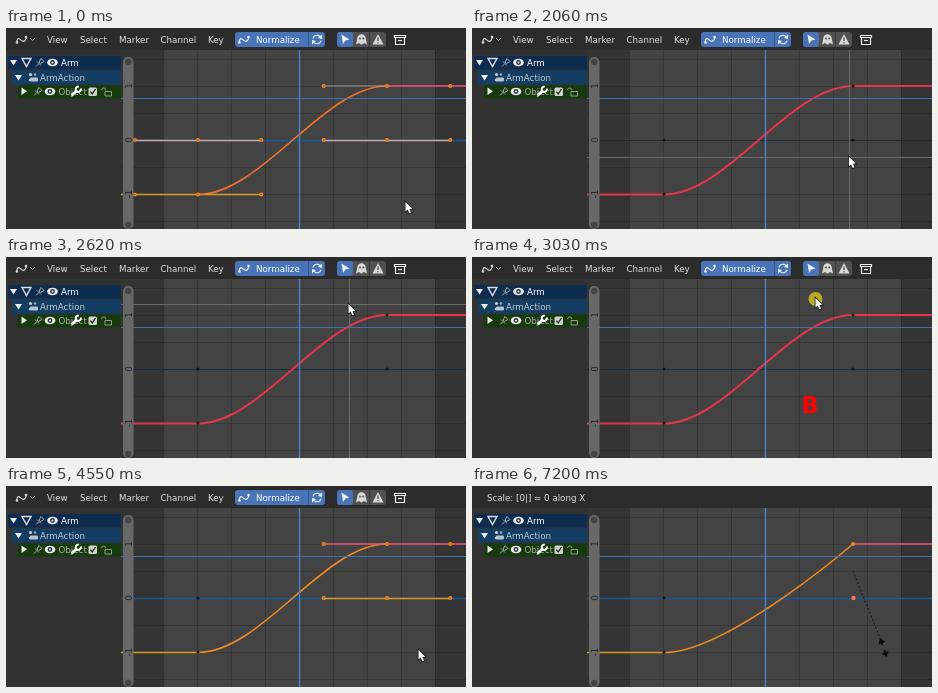
These frames come from a looping animation (460 px wide and 201 px high, 8000 ms). An HTML page with a canvas:

```html
<!DOCTYPE html>
<html lang="en">
<head>
<meta charset="utf-8">
<title>Graph editor: box select and scale</title>
<style>
html, body { margin: 0; width: 100%; height: 100%; overflow: hidden; background: #303030; }
canvas { display: block; width: 460px; height: 201px; }
</style>
</head>
<body>
<canvas id="stage"></canvas>
<script>
const W = 460, H = 201, LOOP = 8000;
const canvas = document.getElementById('stage');
const dpr = window.devicePixelRatio || 1;
canvas.width = W * dpr;
canvas.height = H * dpr;
const c = canvas.getContext('2d');

const UI = '8.7px "DejaVu Sans", sans-serif';
const KEY = 'bold 22.5px "DejaVu Sans", sans-serif';
const ORANGE = '#f08a22', RED = '#e5354d', PINK = '#f0567a', BLUE = '#17589c', YELLOW = '#d99a1e';
const TOP = 58, MID = 112, LOW = 166, KEY_A = 192, KEY_B = 381, HANDLE = 63.3;

// Pointer path: time, x, y
const PATH = [
  [0, 399.5, 174], [1930, 399.5, 174], [2060, 377, 129], [2300, 358, 83], [2620, 342.5, 47],
  [2770, 343.5, 41], [3210, 343.5, 41], [3440, 368, 80], [3660, 396.5, 122],
  [3840, 406, 147], [4100, 406, 147], [4400, 412.5, 164], [LOOP, 412.5, 164]
];

function pointer(t) {
  let i = 1;
  while (t > PATH[i][0]) i++;
  const [t0, x0, y0] = PATH[i - 1], [t1, x1, y1] = PATH[i];
  const p = (t - t0) / (t1 - t0);
  return [x0 + (x1 - x0) * p, y0 + (y1 - y0) * p];
}

function rect(x, y, w, h, color, r = 0) {
  c.fillStyle = color;
  c.beginPath();
  c.roundRect(x, y, w, h, r);
  c.fill();
}

function trace(pts, close) {
  c.beginPath();
  for (let i = 0; i < pts.length; i += 2) c.lineTo(pts[i], pts[i + 1]);
  if (close) c.closePath();
}

function line(pts, color, width = 1, close = false) {
  trace(pts, close);
  c.strokeStyle = color;
  c.lineWidth = width;
  c.stroke();
}

function poly(pts, color) {
  trace(pts, true);
  c.fillStyle = color;
  c.fill();
}

function dot(x, y, r, color) {
  c.fillStyle = color;
  c.beginPath();
  c.arc(x, y, r, 0, 7);
  c.fill();
}

function arc(x, y, r, a, b, color, width = 1) {
  c.strokeStyle = color;
  c.lineWidth = width;
  c.beginPath();
  c.arc(x, y, r, a, b);
  c.stroke();
}

function text(s, x, y, color = '#dedede', font = UI, align = 'left') {
  c.font = font;
  c.textAlign = align;
  c.fillStyle = color;
  c.fillText(s, x, y);
}

const hline = (x0, x1, y, color, w = 1.3) => line([x0, y, x1, y], color, w);

function handleDot(x, y) {
  dot(x, y, 2.1, ORANGE);
  dot(x, y, 0.8, '#a35a1c');
}

function curveIcon(x, y, color) {
  c.strokeStyle = color;
  c.lineWidth = 1.1;
  c.beginPath();
  c.moveTo(x - 5, y + 3);
  c.bezierCurveTo(x - 3, y - 8, x + 1, y + 9, x + 5, y - 2);
  c.stroke();
  dot(x - 4.5, y + 3, 1.3, color);
  dot(x + 4.5, y - 2.5, 1.3, color);
}

function pin(x, y) {
  line([x - 4, y + 4, x - 1, y + 1], '#a5a9ad');
  line([x - 3, y - 1, x + 1, y + 3], '#a5a9ad');
  line([x - 1, y - 0.5, x + 1, y - 4, x + 4, y - 1, x + 0.5, y + 1], '#a5a9ad', 1, true);
}

function eye(x, y) {
  c.fillStyle = '#ececec';
  c.beginPath();
  c.ellipse(x, y, 5.3, 3.8, 0, 0, 7);
  c.fill();
  dot(x, y, 2.4, '#243341');
  dot(x, y, 1.1, '#ececec');
}

function header() {
  const white = '#eeeeee';
  curveIcon(15.5, 11.5, '#d6d6d6');
  line([24, 10, 26.5, 12.5, 29, 10], '#aaa');
  [['View', 41], ['Select', 74], ['Marker', 113], ['Channel', 154.5], ['Key', 202]]
    .forEach(([s, x]) => text(s, x, 15));

  rect(229, 4, 90, 15, '#4a74b8', 3);
  line([302.5, 4, 302.5, 19], '#37598f');
  curveIcon(238, 11.5, white);
  text('Normalize', 250, 15, '#fff');
  arc(311, 11.5, 4.2, 3.4, 5.9, white, 1.2);
  arc(311, 11.5, 4.2, 0.3, 2.8, white, 1.2);
  poly([316, 6.5, 316, 11, 312, 10], white);
  poly([306, 16.5, 306, 12, 310, 13], white);

  rect(331, 4, 49, 15, '#505050', 3);
  rect(331, 4, 16, 15, '#4a74b8', 3);
  line([363.5, 4, 363.5, 19], '#3b3b3b');
  poly([335.5, 6.5, 343.5, 11.5, 339.5, 12.5, 337, 16], white);
  c.fillStyle = '#d8d8d8';
  c.beginPath();
  c.arc(355.5, 10.5, 4.2, Math.PI, 0);
  c.lineTo(361, 16.5);
  c.lineTo(358, 15);
  c.lineTo(355.5, 16.8);
  c.lineTo(353, 15);
  c.lineTo(350, 16.5);
  c.fill();
  dot(354, 10.5, 0.9, '#444');
  dot(357.2, 10.5, 0.9, '#444');
  poly([372, 6, 377.5, 16.5, 366.5, 16.5], '#d8d8d8');
  line([372, 9.5, 372, 13], '#444', 1.2);
  dot(372, 14.8, 0.7, '#444');

  line([388.5, 7.5, 399.5, 7.5, 399.5, 9.5, 388.5, 9.5], white, 1.2, true);
  line([389.5, 10, 389.5, 16.5, 398.5, 16.5, 398.5, 10], white, 1.2);
  line([392, 12.5, 396, 12.5], white, 1.2);
}

function channels() {
  rect(0, 22, 115, H - 22, '#323232');
  rect(2, 28, 113, 13.5, '#0e2c50');
  rect(6, 42.5, 109, 14, '#143d63');
  rect(12, 57.5, 103, 13, '#173a0c');

  poly([4, 32, 11, 32, 7.5, 37.5], '#eee');
  line([16, 30.5, 25, 30.5, 20.5, 38.5], '#ddd', 1.4, true);
  pin(34, 34.5);
  eye(46.5, 34.5);
  text('Arm', 55, 38, '#fff');

  poly([9, 47, 16, 47, 12.5, 52.5], '#eee');
  dot(24.5, 46.5, 1.6, '#ccc');
  dot(29, 46.5, 1.3, '#9ab');
  rect(24, 49.5, 8, 4, '#b8c3cc', 1);
  dot(24, 52, 1.2, '#ccc');
  text('ArmAction', 34, 53, '#c3cbd2');

  poly([15.5, 59.5, 15.5, 67, 21, 63.3], '#eee');
  pin(32, 63.5);
  eye(44, 63.5);
  text('Object', 52.5, 67, '#a9b4a4');
  line([65.5, 67.5, 71, 62.5], '#fff', 2.8);
  arc(72.3, 61.3, 2.6, -0.3, 4.9, '#fff', 2);
  rect(82.5, 59.5, 8.5, 8.5, '#cfd3cd', 1.5);
  line([84.3, 63.7, 86.2, 66, 89.5, 61], '#222', 1.3);
  line([99, 63.5, 105.5, 63.5, 105.5, 68, 99, 68], '#8f9d89', 1, true);
  arc(97.7, 62.2, 2.2, Math.PI, 0, '#8f9d89');
}

function grid() {
  rect(115, 22, W - 115, H - 22, '#343434');
  rect(157.5, 22, 271.5, H - 22, '#434343');
  for (let x = 157.5; x < 440; x += 34) line([x, 22, x, H], 'rgba(0,0,0,.17)');
  for (let y = 31.5; y < H; y += 27) hline(115, W, y, 'rgba(0,0,0,.17)', 1);
}

function mainCurve(color, width, flat) {
  c.strokeStyle = color;
  c.lineWidth = width;
  c.beginPath();
  c.moveTo(KEY_A, LOW + 0.5);
  c.bezierCurveTo(KEY_A + HANDLE, LOW + 0.5, flat ? KEY_B : KEY_B - HANDLE, TOP, KEY_B, TOP);
  c.stroke();
}

function curves(t) {
  const left = KEY_A - HANDLE, right = KEY_B + HANDLE, start = KEY_B - HANDLE, end = KEY_A + HANDLE;
  const all = t < 790, some = t >= 4550, scaled = t >= 7100;
  if (all) {
    hline(115, W, MID + 0.5, BLUE);
    hline(left, end, MID + 0.5, '#cfa3a0');
    hline(start, right, MID + 0.5, '#cfa3a0');
    hline(115, end, LOW + 0.5, YELLOW, 1.5);
    mainCurve('#f4722e', 1.6, false);
    hline(start, KEY_B, TOP, '#a89a90', 1);
    hline(KEY_B, W, TOP, PINK, 1.6);
    for (const x of [left, KEY_A, end]) { handleDot(x, MID); handleDot(x, LOW + 0.5); }
  } else if (some) {
    hline(115, W, MID + 0.5, BLUE, 1.4);
    hline(115, KEY_A, LOW + 0.5, YELLOW, 1.6);
    mainCurve(ORANGE, 1.6, scaled);
    hline(KEY_B, W, TOP, PINK, 1.6);
    if (!scaled) {
      const late = t >= 5880;
      hline(start, KEY_B, TOP, late ? ORANGE : PINK, 1.5);
      hline(start, right, MID + 0.5, late ? '#c9bd98' : YELLOW, 1.4);
    }
    dot(KEY_A, MID, 1.5, '#111');
    dot(KEY_A, LOW, 1.5, '#111');
  } else {
    hline(115, W, MID + 0.5, '#172d47', 1);
    hline(115, KEY_A, LOW + 0.5, RED, 2);
    mainCurve(RED, 2, false);
    hline(KEY_B, W, TOP, RED, 2);
    for (const y of [MID, LOW]) dot(KEY_A, y, 1.5, '#111');
    for (const y of [MID, TOP]) dot(KEY_B, y, 1.5, '#111');
  }
  if (scaled) {
    dot(KEY_B, TOP, 2, ORANGE);
    dot(KEY_B + 0.5, MID, 2.2, '#f0785c');
  } else if (all || some) {
    for (const x of [start, KEY_B, right]) { handleDot(x, TOP); handleDot(x, MID); }
  }
}

function scrollbar() {
  rect(117, 29, 10.5, 172, '#686868', 5);
  for (const y of [34, 197]) dot(122.2, y, 3.2, '#444');
  [['1', TOP], ['0', MID], ['-1', LOW]].forEach(([s, y]) => {
    c.save();
    c.translate(125.5, y);
    c.rotate(-Math.PI / 2);
    text(s, 0, 0, '#222', UI, 'center');
    c.restore();
  });
}

function arrow(x, y) {
  c.save();
  c.translate(x, y);
  const shape = [0, 0, 0, 9.5, 2.2, 7.6, 3.8, 11.3, 5.5, 10.5, 4, 7, 6.8, 6.8];
  line(shape, '#1c1c1c', 1.6, true);
  poly(shape, '#fff');
  c.restore();
}

function scaleCursor() {
  c.setLineDash([2, 2]);
  line([KEY_B, 85, 408.5, 153], '#1b1b1b', 1);
  c.setLineDash([]);
  poly([408, 152, 413.5, 156, 406.5, 158.5], '#0c0c0c');
  line([409, 155, 410.5, 159], '#0c0c0c', 1.6);
  line([412.2, 164, 413.8, 168], '#0c0c0c', 1.6);
  poly([414.8, 171, 409.5, 167.5, 416.5, 164.8], '#0c0c0c');
}

function keys(t) {
  const show = (s, x) => text(s, x, 156, '#f00', KEY, 'center');
  if (t >= 2820 && t < 3840) show('B', 338);
  if (t >= 5880 && t < 7200) {
    show('S', 337);
    if (t >= 6260) show('X', 376);
    if (t >= 6590) show('0', 414);
  }
}

function draw(t) {
  c.setTransform(dpr, 0, 0, dpr, 0, 0);
  const [x, y] = pointer(t), scaling = t >= 6180;
  grid();
  curves(t);
  hline(115, W, 70.5, '#416fae', 1.2);
  line([293.5, 22, 293.5, H], '#4c80c8', 1.4);

  if (t >= 1830 && t < 3030) {
    hline(115, W, Math.round(y) + 0.5, '#6c6c6a', 1);
    const cx = Math.round(x) + 0.5;
    line([cx, 22, cx, H], '#6c6c6a');
  }
  if (t >= 3210 && t < 4550) {
    rect(343.5, 41.5, x - 343.5, y - 41.5, 'rgba(255,255,255,.07)');
    c.setLineDash([2, 1]);
    line([343.5, 41.5, x, 41.5, x, y, 343.5, y], '#7d7d7d', 1, true);
    c.setLineDash([]);
  }

  channels();
  scrollbar();
  rect(0, 0, W, 22, '#2c2c2c');
  if (!scaling) header();
  else text(t < 6260 ? 'Scale X: 1.000   Y: 1.000' : t < 7100 ? 'Scale: 1.000 along X' : 'Scale: [0|] = 0 along X', 15, 15.3);

  keys(t);
  if (t >= 3030 && t < 4550) dot(x, y + 1, 7, 'rgba(200,187,28,.88)');
  if (scaling) scaleCursor();
  else arrow(x, y);
}

function tick(now) {
  draw(now % LOOP);
  requestAnimationFrame(tick);
}
draw(0);
requestAnimationFrame(tick);
</script>
</body>
</html>
```
